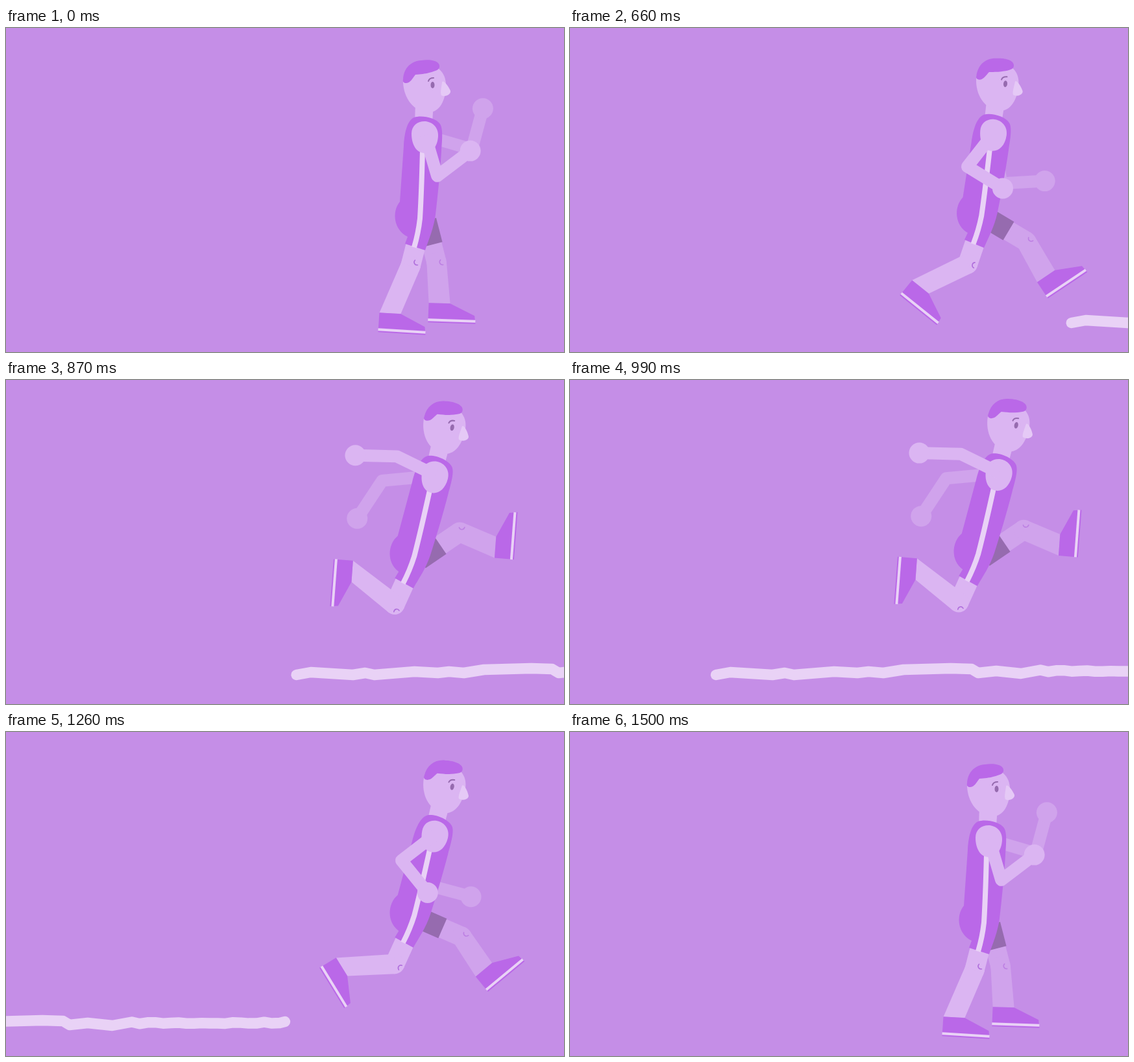
An HTML page with a canvas for the animation above (1.71 s loop, 860 by 500 pixels).

```html
<!DOCTYPE html>
<html lang="en">
<head>
<meta charset="utf-8">
<title>Runner</title>
<style>
  html, body { margin: 0; width: 100%; height: 100%; overflow: hidden; background: #c58ee7; }
  canvas { display: block; width: 860px; height: 500px; }
</style>
</head>
<body>
<canvas id="stage" width="860" height="500"></canvas>
<script>
const ctx = document.getElementById('stage').getContext('2d');
const LOOP = 1710, STEP = 30, LANDED = 1500;
const C = {
  bg: '#c58ee7', skin: '#dbb5f2', far: '#d0a3ec', kit: '#ba68e8',
  light: '#e9d2f6', shade: '#966baf', nose: '#e5c9f6',
  knee: '#b06fdc', farKnee: '#bd80e3'
};

// Joint angles in degrees and lengths: [standing, mid-leap].
const nearArm = { upper: [73.6, 195], bend: [-110.8, -24.5], l1: [66, 66], l2: [64, 64] };
const farArm = { upper: [16.3, 163.7], bend: [-91.2, -51.2], l1: [75, 82], l2: [65, 70] };
const nearLeg = { thigh: [102.6, 112.7], shin: [113, 217.9], foot: [0, 90.8], l1: [30, 36], l2: [79.3, 83] };
const farLeg = { thigh: [75.6, -34.2], shin: [85.5, 22.7], foot: [-1.5, -89.2], l1: [67, 74.6], l2: [63, 59.6] };

const P = s => new Path2D(s);
const shape = {
  neck: P('M631 116H659L657 145H630Z'),
  head: P('M612 84C612 66 628 56 645 56C664 56 678 68 678 88C678 112 668 130 652 130C628 130 613 108 612 84Z'),
  hair: P('M612 79C613 62 624 51 640 50C652 48 667 50 668 58C669 64 664 66 652 69C645 71 640 71 631 72C626 78 624 84 617 85C613 85 611 83 612 79Z'),
  nose: P('M672 84C671 92 669 100 671 104C678 107 686 102 685 97C683 92 679 86 675 83C673 82 672 83 672 84Z'),
  brow: P('M651 82C652 78 655 77 659 77'),
  torso: P('M607 268L613 182C614 162 618 143 629 138C640 134 662 138 669 148C674 156 672 175 671 190C669 225 665 262 662 288C659 310 652 325 646 343L615 333L619 322C598 312 594 284 607 268Z'),
  stripe: P('M642 188C641 230 640 260 638 294C636 312 633 325 629 338.5'),
  shoulder: P('M625 163C625 151 634 144 645 144S667 153 666 167C665 184 656 193 645 193C632 193 625 179 625 163Z'),
  shoe: P('M-17 -1L16 1L53 21L54 33.5L-19 29Z'),
  sole: P('M-19 25L54 29.5'),
  kneecap: P('M-1 -4C-4 -1 -2 4 3 3.5'),
  ground: groundPath()
};

// A brush line: long waves first, then a fine seeded ripple.
function groundPath() {
  const path = P('M8 455L30 451L95 455L114 452L128 455L190 450L226 452L243 450L266 452L297 447L370 445L402 446L412 452L440 449L478 453');
  let seed = 7;
  for (let x = 508; x < 744; x += 12) {
    seed = seed * 16807 % 2147483647;
    path.lineTo(x, 449 + 3 * (seed / 2147483647 - 0.5));
  }
  path.lineTo(744, 447);
  return path;
}

const mix = ([a, b], p) => a + (b - a) * p;
const rad = d => d * Math.PI / 180;
const along = ([x, y], deg, len) => [x + len * Math.cos(rad(deg)), y + len * Math.sin(rad(deg))];
const span = (a, b, t) => Math.min(1, Math.max(0, (t - a) / (b - a)));

// Soft rise from start to top, then a nearly even return that begins at leave.
function cycle(start, top, leave, t) {
  const up = span(start, top, t), down = span(leave, LANDED, t);
  const back = down - Math.sin(2 * Math.PI * down) / (8 * Math.PI);
  return (1 - Math.cos(Math.PI * up)) / 2 * (1 - back);
}

// Speeds up until 990 ms, then runs evenly.
function groundX(t) {
  const d = t - 990;
  return 217 - 1.967 * d - 0.00093 * Math.min(0, d) ** 2;
}

function fill(path, color) {
  ctx.fillStyle = color;
  ctx.fill(path);
}

function stroke(path, color, width, cap = 'butt') {
  ctx.strokeStyle = color;
  ctx.lineWidth = width;
  ctx.lineCap = cap;
  ctx.lineJoin = 'round';
  ctx.stroke(path);
}

function pathOf(points) {
  const path = new Path2D();
  points.forEach(p => path.lineTo(...p));
  return path;
}

function disc([x, y], rx, ry, color) {
  ctx.beginPath();
  ctx.ellipse(x, y, rx, ry, 0, 0, 7);
  ctx.fillStyle = color;
  ctx.fill();
}

function placed([x, y], deg, paint) {
  ctx.save();
  ctx.translate(x, y);
  ctx.rotate(rad(deg));
  paint();
  ctx.restore();
}

function arm(root, rig, p, tilt, color) {
  const upper = mix(rig.upper, p) + tilt;
  const elbow = along(root, upper, mix(rig.l1, p));
  const hand = along(elbow, upper + mix(rig.bend, p * p), mix(rig.l2, p));
  stroke(pathOf([root, elbow, hand]), color, 19);
  disc(hand, 16, 16, color);
}

function leg(root, hip, rig, pThigh, pShin, color, kneeColor, mark) {
  const shin = mix(rig.shin, pShin), foot = mix(rig.foot, pShin);
  const knee = along(hip, mix(rig.thigh, pThigh), mix(rig.l1, pThigh));
  const ankle = along(knee, shin, mix(rig.l2, pShin));

  stroke(pathOf([root, knee]), color, 30.5);
  disc(knee, 15.25, 15.25, color);
  fill(pathOf([
    along(knee, shin + 90, 15.25), along(ankle, foot + 183, 17),
    along(ankle, foot + 3, 16), along(knee, shin - 90, 15.25)
  ]), color);

  placed(knee, shin - rig.shin[0], () => {
    ctx.translate(...mark);
    stroke(shape.kneecap, kneeColor, 1.6, 'round');
  });
  placed(ankle, foot, () => {
    fill(shape.shoe, C.kit);
    stroke(shape.sole, C.light, 4);
  });
}

function upperBody() {
  fill(shape.neck, C.skin);
  fill(shape.head, C.skin);
  fill(shape.hair, C.kit);
  fill(shape.nose, C.nose);
  disc([657.5, 88], 3, 5, C.shade);
  stroke(shape.brow, C.shade, 2, 'round');
  fill(shape.torso, C.kit);
  stroke(shape.stripe, C.light, 8);
  fill(shape.shoulder, C.skin);
}

function draw(t) {
  ctx.fillStyle = C.bg;
  ctx.fillRect(0, 0, 860, 500);
  placed([groundX(t), 0], 0, () => stroke(shape.ground, C.light, 16.5, 'round'));

  const swing = cycle(510, 850, 1000, t);
  const kick = cycle(540, 820, 1090, t);
  const lift = cycle(540, 970, 1000, t);
  const lean = cycle(540, 800, 1260, t);

  const tilt = 11 * lean;
  const pelvis = [mix([630, 613], lean), mix([338, 310], lift)];
  const attach = (x, y) => {
    const s = Math.sin(rad(tilt)), c = Math.cos(rad(tilt)), dx = x - 630, dy = y - 338;
    return [pelvis[0] + c * dx - s * dy, pelvis[1] + s * dx + c * dy];
  };

  arm(attach(646, 166), farArm, swing, tilt, C.far);

  const hip = attach(647, 297);
  leg(hip, hip, farLeg, swing, swing, C.far, C.farKnee, [7, 0]);
  stroke(pathOf([hip, along(hip, mix(farLeg.thigh, swing), 38.5)]), C.shade, 33);

  leg(attach(634, 326), pelvis, nearLeg, lean, kick, C.skin, C.knee, [8, -5]);

  placed(pelvis, tilt, () => {
    ctx.translate(-630, -338);
    upperBody();
  });

  arm(attach(646, 165), nearArm, swing, tilt, C.skin);
}

function tick() {
  const t = performance.now() % LOOP;
  draw(Math.floor(t / STEP) * STEP);
  requestAnimationFrame(tick);
}
tick();
</script>
</body>
</html>
```
